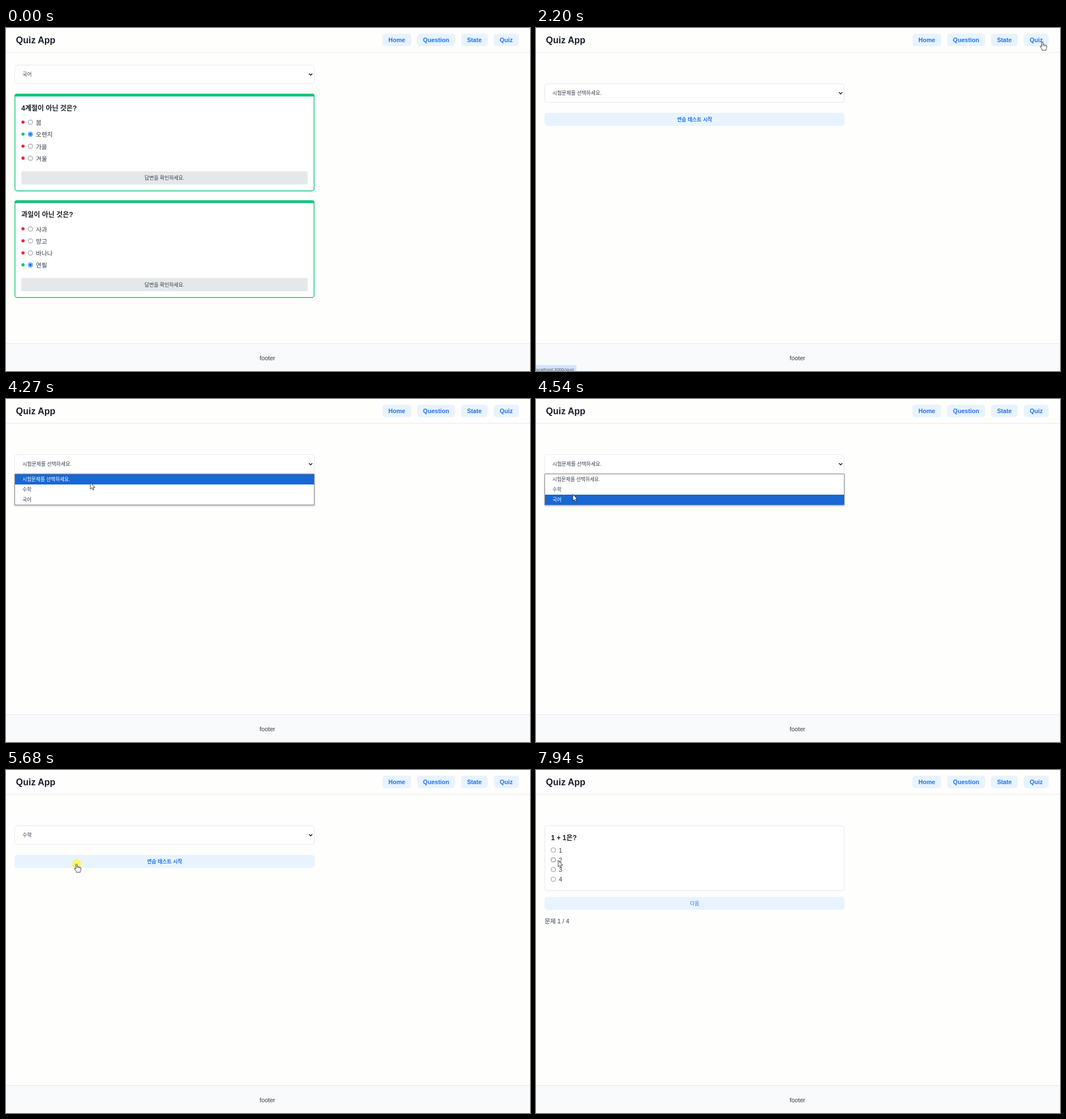
Recreate the animation shown at these times as an HTML page. Size 924 by 606 pixels, loop 8000 ms.

```html
<!DOCTYPE html>
<html lang="ko">
<head>
<meta charset="utf-8">
<title>Quiz App</title>
<style>
  html, body { margin: 0; width: 100%; height: 100%; overflow: hidden; background: #fefefd; }
  svg { display: block; width: 924px; height: 606px; }
  text { font-family: "Liberation Sans", Arial, "Noto Sans CJK KR", "Noto Sans CJK", sans-serif; white-space: pre; }
  .status { font-family: "Open Sans", "Noto Sans", sans-serif; }
</style>
</head>
<body>
<svg id="stage" viewBox="0 0 924 606"></svg>
<script>
const LOOP = 8000, FRAME = 1000 / 15;
const INK = '#191f28', BODY = '#333d4b', LINE = '#e5e8eb', BLUE = '#2272eb',
      PALE = '#e8f3ff', GREEN = '#15c47e', RED = '#e42939';

// Drawing helpers
const text = (s, x, y, size = 10.7, fill = BODY, extra = '') =>
  `<text x="${x}" y="${y}" font-size="${size}" fill="${fill}" ${extra}>${s}</text>`;
const MIDDLE = 'text-anchor="middle"', BOLD = 'font-weight="700"';
const box = (x, y, w, h, fill, r = 0, extra = '') =>
  `<rect x="${x}" y="${y}" width="${w}" height="${h}" rx="${r}" fill="${fill}" ${extra}/>`;
const dot = (x, y, r, fill, extra = '') =>
  `<circle cx="${x}" cy="${y}" r="${r}" fill="${fill}" ${extra}/>`;
const group = (id, body) => `<g id="${id}">${body}</g>`;

const radio = (x, y, on) => on
  ? dot(x, y, 4, '#fff', 'stroke="#0075ff" stroke-width=".9"') + dot(x, y, 2.6, '#0075ff')
  : dot(x, y, 4, '#fff', 'stroke="#767676" stroke-width=".8" class="radio"');

const outline = (y, h) => box(15.5, y, 528, h, '#fff', 4, `stroke="${LINE}"`);

const select = (y, label, id) => outline(y, 33) +
  text(label, 29, y + 19.3, 8.9, BODY, id ? `id="${id}"` : '') +
  `<path d="M534.3 ${y + 15.1}l2.9 2.9 2.9-2.9" fill="none" stroke="#111" stroke-width="1.4"/>`;

const wideButton = (y, label, weight) => box(15, y, 529, 23, PALE, 5) +
  text(label, 279.7, y + 15, 8.9, BLUE, `${MIDDLE} font-weight="${weight}"`);

function answerCard(y, title, options, right) {
  const rows = options.map((label, i) => {
    const cy = y + 50.5 + i * 21.2;
    return dot(30, cy - .2, 2.8, i === right ? GREEN : RED) +
      radio(43, cy, i === right) + text(label, 52.8, cy + 4.6);
  }).join('');
  return box(15.7, y + .7, 527.6, 171, '#fff', 4, `stroke="${GREEN}" stroke-width="1.4"`) +
    `<path d="M15 ${y + 5}v-1q0-4 4-4h521q4 0 4 4v1z" fill="${GREEN}"/>` +
    text(title, 27, y + 29.5, 12, INK, BOLD) + rows +
    box(27, y + 137.2, 505, 23.3, LINE, 2.5) +
    text('답변을 확인하세요.', 279.5, y + 152.4, 8.9, BODY, MIDDLE);
}

const navButton = ([label, x, w]) => box(x, 10, w, 22, PALE, 5.4) +
  text(label, x + w / 2, 24.6, 10.7, BLUE, `${MIDDLE} ${BOLD}`);

const frame =
  text('Quiz App', 17.5, 26.6, 16, INK, BOLD) +
  [['Home', 663.7, 51], ['Question', 725, 67], ['State', 802.5, 47], ['Quiz', 860, 44]].map(navButton).join('') +
  box(0, 42.6, 924, 1, LINE) +
  box(0, 557, 924, 49, '#f9fafc') + box(0, 557, 924, 1, LINE) +
  text('footer', 461, 587.4, 10.7, BODY, MIDDLE);

const review = select(65.5, '국어') +
  answerCard(116, '4계절이 아닌 것은?', ['봄', '오렌지', '가을', '겨울'], 1) +
  answerCard(304.5, '과일이 아닌 것은?', ['사과', '망고', '바나나', '연필'], 3);

const PROMPT = '시험문제를 선택하세요.';
const start = select(98.5, PROMPT, 'choice') + wideButton(150, '연습 테스트 시작', 600);

const popup = box(15.5, 132.6, 528, 54.4, '#fff', 0, 'stroke="#767676" stroke-width=".8" filter="url(#shade)"') +
  box(16, 133, 527.3, 18, '#1967d2', 0, 'id="marker"') +
  [PROMPT, '수학', '국어'].map((s, i) => text(s, 29, 145.4 + i * 17.9, 8.65, BODY, 'class="option"')).join('');

const question = outline(98.5, 114.5) + text('1 + 1은?', 26.5, 123.6, 12, INK, BOLD) +
  [1, 2, 3, 4].map((n, i) => radio(30.6, 141.4 + i * 17.2) + text(n, 40.2, 145.6 + i * 17.2)).join('') +
  wideButton(224.3, '다음', 500) + text('문제 1 / 4', 15.2, 270.6);

const status = '<path d="M0 595.6h68.5q3 0 3 3v8H0z" fill="#d3e3fd"/>' +
  text('localhost:3000/quiz', 67, 605.8, 7.6, '#474747', 'text-anchor="end" class="status"');

const PEN = 'fill="#fff" stroke="#111" stroke-width=".8" stroke-linejoin="round"';
const pointer = group('click', dot(0, 0, 8, '#fffb3c', 'opacity=".75"')) +
  group('arrow', `<path d="M0 0V11.4L2.6 9 4.4 13 6.2 12.2 4.5 8.3H8Z" ${PEN}/>`) +
  group('hand', `<path d="M-1.2 1.2Q0-.4 1.2 1.2V5.5Q2.4 4.6 3.4 5.9 4.6 5.2 5.5 6.5 7.3 6 7.6 7.6V10.5Q7.4 12 6.4 13.3V15.3H-.4V13.8Q-2.6 11.4-3.8 9.2-4 7.6-2.6 7.8L-1.2 9.2Z" ${PEN}/>` +
    '<path d="M1.2 5.5v2.6M3.4 5.9v2.4M5.5 6.5v2" stroke="#111" stroke-width=".6"/>');

const stage = document.getElementById('stage');
stage.innerHTML =
  '<defs><filter id="shade" x="-5%" y="-20%" width="110%" height="150%">' +
  '<feDropShadow dx="0" dy="1.2" stdDeviation="1.6" flood-opacity=".35"/></filter></defs>' +
  frame + group('review', review) + group('start', start) + group('popup', popup) +
  group('question', question) + group('status', status) + group('pointer', pointer);

const el = id => document.getElementById(id);
const show = (id, on) => el(id).setAttribute('display', on ? 'inline' : 'none');
const options = [...document.querySelectorAll('.option')];
const radios = [...document.querySelectorAll('#question .radio')];

// Pointer legs: first and last moving time, then where the leg ends
const legs = [
  [1120, 1120, 912, 17], [1190, 1590, 893, 24],
  [2730, 3410, 266, 119], [4010, 4540, 65, 168.6],
  [4940, 5080, 68, 161], [5270, 5540, 124.5, 165.5],
  [6540, 6540, 93, 168.6], [6610, 7340, 32, 157], [7410, 7940, 39, 159.7]
];
const tick = ms => Math.floor((ms + 14) / FRAME);
const smooth = p => p * p * (3 - 2 * p);

function pointerAt(now) {
  let [, , x, y] = legs[0];
  for (const [from, to, endX, endY] of legs) {
    const a = tick(from), b = tick(to);
    if (now < a) break;
    const p = smooth(Math.min(1, (now - a + 1) / (b - a + 1)));
    x += (endX - x) * p;
    y += (endY - y) * p;
  }
  return [x, y];
}

function render(ms) {
  const now = tick(ms), within = (a, b) => now >= tick(a) && now < tick(b);
  const [x, y] = pointerAt(now);
  const asking = now >= tick(5810), open = within(3480, 5210);

  show('review', within(0, 2200));
  show('start', within(2200, 5810));
  show('question', asking);
  show('popup', open);
  show('status', within(1320, 2870));

  el('choice').textContent = now >= tick(5210) ? '수학' : PROMPT;
  const row = y < 151 ? 0 : y < 168 ? 1 : 2;
  el('marker').setAttribute('y', 133 + row * 18);
  options.forEach((o, i) => o.setAttribute('fill', i === row ? '#fff' : BODY));

  const hovered = asking && x < 47 ? Math.round((y - 141.4) / 17.2) : -1;
  radios.forEach((r, i) => r.setAttribute('stroke', i === hovered ? '#4f4f4f' : '#767676'));

  const onNav = y > 10 && y < 32 && x > 860 && x < 904;
  const hand = onNav || within(5270, 6540);
  show('pointer', now >= tick(1120));
  show('hand', hand);
  show('arrow', !hand);
  show('click', within(3480, 3610) || within(5140, 5270) || within(5680, 5810));
  el('pointer').setAttribute('transform', `translate(${x.toFixed(1)} ${y.toFixed(1)})`);
}

const begun = performance.now();
function loop() {
  render((performance.now() - begun) % LOOP);
  requestAnimationFrame(loop);
}
loop();
</script>
</body>
</html>
```
